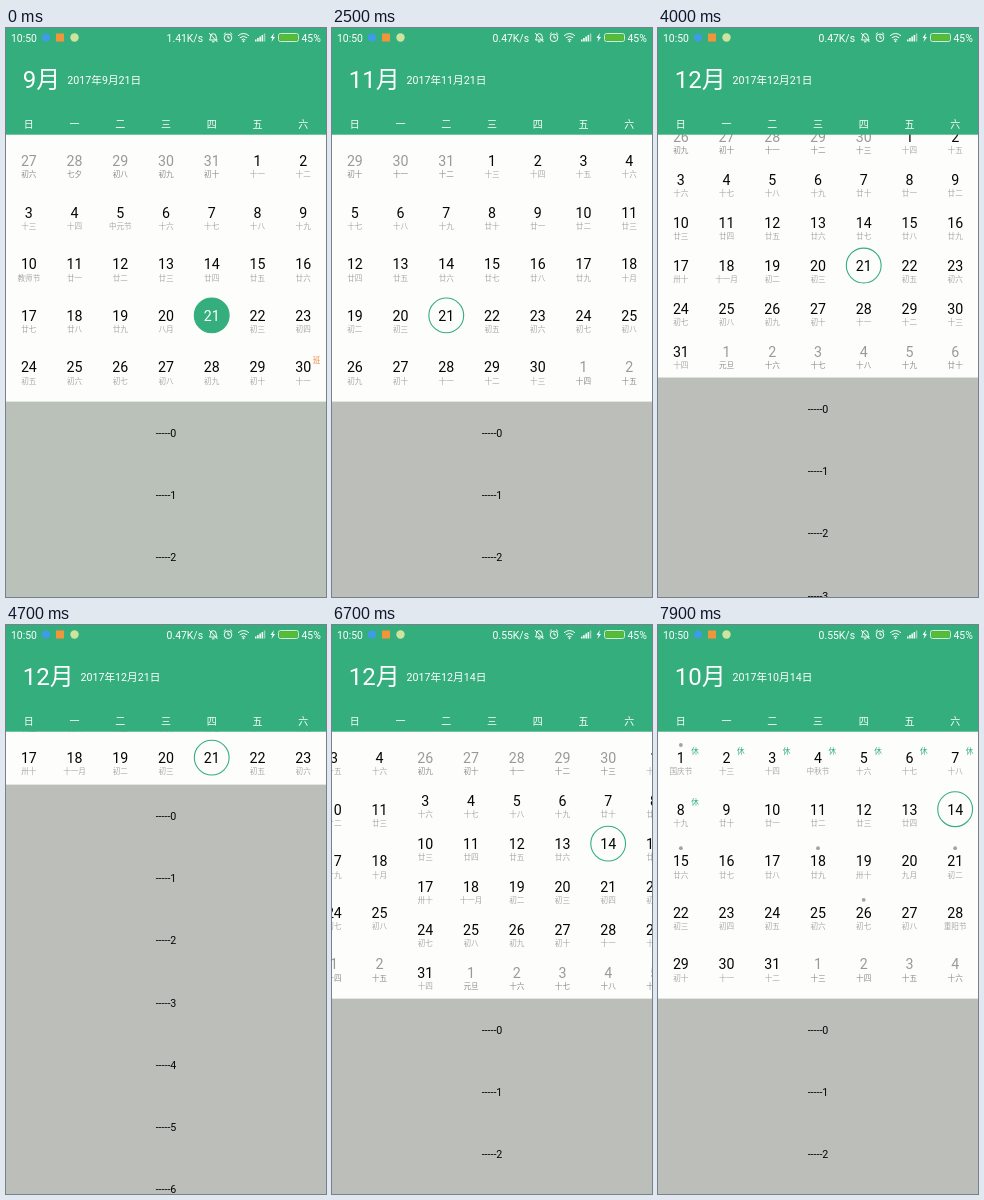
An HTML page that plays this animation: 320x569 px, repeating every 8000 ms.

```html
<!DOCTYPE html>
<html lang="zh-CN">
<head>
<meta charset="utf-8">
<title>Calendar</title>
<style>
html, body { margin: 0; width: 100%; height: 100%; overflow: hidden; background: #fdfefc; }
svg { display: block; width: 100vw; height: 100vh; font-family: Roboto, "Noto Sans CJK SC", "Noto Sans CJK", sans-serif; }
.mid { text-anchor: middle; }
.day { font-size: 14.2px; }
.lunar { font-size: 7.6px; }
</style>
</head>
<body>
<svg viewBox="0 0 320 569" preserveAspectRatio="none">
  <g id="pages"></g>
  <g id="list"></g>
  <rect width="320" height="106.7" fill="#35ae7d"/>
  <g id="bar" fill="#fff" font-size="10.4" transform="translate(0 0.5)"></g>
  <g fill="#fff">
    <text id="month" x="16.8" y="60.4" font-size="24"></text>
    <text id="date" y="56" font-size="10.67"></text>
    <g id="week" class="mid" font-size="10"></g>
  </g>
</svg>
<script>
const $ = id => document.getElementById(id);
const GREEN = '#35ae7d', INK = '#050505', LOOP = 8000, STEP = 100;
const TOP = 133, FULL = 373.6, FOLD = 214;
const colX = c => 320 / 7 * (c + 0.5);
const text = (x, y, s, attrs = '') => `<text x="${x}" y="${y}" ${attrs}>${s}</text>`;

// Calendar data
const dayNo = (m, d) => Date.UTC(2017, m - 1, d) / 864e5;
const moons = [['七月', 8, 22], ['八月', 9, 20], ['九月', 10, 20], ['十月', 11, 18], ['十一月', 12, 18]]
  .map(([name, m, d]) => ({ name, start: dayNo(m, d) }));
const feasts = { '8-28': '七夕', '9-5': '中元节', '9-10': '教师节', '10-1': '国庆节', '10-4': '中秋节', '10-28': '重阳节', '1-1': '元旦' };
const dots = ['10-1', '10-15', '10-18', '10-21', '10-26'];
const digits = '十一二三四五六七八九';

function lunar(n, key) {
  if (feasts[key]) return feasts[key];
  const moon = moons.filter(m => m.start <= n).pop();
  const d = n - moon.start + 1;
  if (d === 1) return moon.name;
  return (d <= 10 ? '初' : '十廿卅'[Math.floor(d / 10) - 1]) + digits[d % 10];
}

function cell(n, month, x, y, sel) {
  const date = new Date(n * 864e5), m = date.getUTCMonth() + 1, d = date.getUTCDate();
  const key = m + '-' + d, inside = m === month, today = key === '9-21';
  const number = fill => text(x, y + 5, d, `class="day" fill="${fill}"`);
  let out = number(!inside ? '#999' : today ? GREEN : INK)
    + text(x, y + 16.3, lunar(n, key), `class="lunar" fill="${inside ? '#a8a8a8' : '#8c8c8c'}"`);
  if (inside && dots.includes(key)) out += `<circle cx="${x}" cy="${y - 13}" r="1.9" fill="#a3a3a3"/>`;
  if (inside && d === sel) {
    out = `<g class="off">${out}</g><g class="on"><circle cx="${x}" cy="${y - 0.4}" r="17.4" `
      + `fill="${today ? GREEN : '#fdfefc'}" stroke="${GREEN}" stroke-width="1.1"/>`
      + number(today ? '#fff' : INK) + '</g>';
  }
  if (inside && m === 10 && d <= 8) out += text(x + 14.3, y - 4.3, '休', `class="lunar" fill="${GREEN}"`);
  if (inside && key === '9-30') out += text(x + 13.4, y - 4.3, '班', 'class="lunar" fill="#ee8b45"');
  return out;
}

function buildPage({ month, sel }) {
  const first = dayNo(month, 1), lead = new Date(first * 864e5).getUTCDay();
  const rows = Math.ceil((lead + dayNo(month + 1, 1) - first) / 7);
  const gap = rows === 6 ? 43 : 51.6;
  let out = '';
  for (let i = 0; i < rows * 7; i++) {
    out += cell(first - lead + i, month, colX(i % 7), TOP + Math.floor(i / 7) * gap, sel);
  }
  return { out, fold: Math.floor((lead + sel - 1) / 7) * gap };
}

// Views in order, each entered by a swipe
const views = [
  { month: 9, sel: 21 },
  { month: 10, sel: 21, at: 1300, n: 6, dir: 1 },
  { month: 11, sel: 21, at: 2200, n: 4, dir: 1 },
  { month: 12, sel: 21, at: 3100, n: 6, dir: 1 },
  { month: 12, sel: 14, at: 5000, n: 5, dir: -1 },
  { month: 11, sel: 14, at: 6700, n: 5, dir: -1 },
  { month: 10, sel: 14, at: 7500, n: 5, dir: -1 }
];
for (const v of views) {
  const { out, fold } = buildPage(v);
  $('pages').insertAdjacentHTML('beforeend', `<g class="mid">${out}</g>`);
  v.el = $('pages').lastChild;
  v.fold = fold;
  v.on = v.el.querySelector('.on');
  v.off = v.el.querySelector('.off');
}

// Fixed parts
$('week').innerHTML = [...'日一二三四五六'].map((s, i) => text(colX(i), 99.6, s)).join('');
let items = '<rect id="panel" width="320" height="480"/>';
for (let i = 0; i < 9; i++) items += text(160, 35.3 + i * 62.25, '-----' + i, `class="mid" font-size="10.67" fill="${INK}"`);
$('list').innerHTML = items;
$('bar').innerHTML = text(5, 13, '10:50') + text(197, 13, '', 'id="speed" text-anchor="end"')
  + text(295.5, 13, '45%')
  + `<circle cx="40" cy="9" r="4" fill="#3f9be8"/>
  <rect x="50" y="5" width="8" height="8" fill="#f2953a"/>
  <circle cx="68.5" cy="9" r="4.2" fill="#cfe3a0"/>
  <g fill="none" stroke="#fff">
    <path d="M203.5 11.5q1-1 1-3.5a2.8 2.8 0 0 1 5.6 0q0 2.5 1 3.500zM206 13.300h2.5M203 4.5l8.5 9"/>
    <circle cx="222" cy="9.300" r="3.8"/>
    <path d="M222 7v2.5h2M217.8 6l2-1.8M226.2 6l-2-1.8"/>
    <path d="M232 7.300q5.5-4.6 11 0M233.8 9.300q3.7-3 7.4 0M235.6 11.300q1.9-1.5 3.8 0"/>
  </g>
  <circle cx="237.5" cy="12.8" r="1"/>`
  + [2, 3.5, 5, 6.5, 8].map((h, i) => `<rect x="${249 + i * 2.2}" y="${13 - h}" width="1.5" height="${h}" opacity="${i < 4 ? 1 : 0.5}"/>`).join('')
  + `<path d="M268 4.5l-3.5 5h2l-1 4 3.5-5h-2z"/>
  <rect x="272.5" y="5" width="20" height="8" rx="2" fill="none" stroke="#d2efc8"/>
  <rect x="273.5" y="6" width="18" height="6" rx="1" fill="#58bd34"/>`;

// Motion
const ramp = (t, at, n) => Math.min(1, Math.max(0, (t - at + STEP) / (n * STEP)));
const swipe = u => 1 - (1 - u ** 1.88) ** 5;
const push = u => 1 - (1 - u ** 1.37) ** 2;
const settle = u => { const s = u ** 1.145; return s * s * (3 - 2 * s); };

// Folding moves month and list together until the selected row is on top;
// opening starts both from the folded pose
const monthLift = (v, lift, t) => t < 5700 ? Math.min(lift, v.fold) : Math.max(0, v.fold - (FOLD - lift));

function render(ms) {
  const t = Math.floor(ms / STEP) * STEP;
  const lift = FOLD * (push(ramp(t, 4000, 8)) - settle(ramp(t, 5700, 6)));

  let cur = 0;
  while (cur + 1 < views.length && t >= views[cur + 1].at) cur++;
  const { at, n, dir = 0 } = views[cur];
  const p = cur ? swipe(ramp(t, at, n)) : 1;
  const active = p > 0.45 ? cur : cur - 1;

  views.forEach((v, i) => {
    const shown = i === cur || (i === cur - 1 && p < 1);
    v.el.style.display = shown ? '' : 'none';
    if (!shown) return;
    const x = dir * 320 * (i === cur ? 1 - p : -p);
    v.el.setAttribute('transform', `translate(${x} ${-monthLift(v, lift, t)})`);
    v.on.style.display = i === active ? '' : 'none';
    v.off.style.display = i === active ? 'none' : '';
  });

  const { month, sel } = views[active];
  $('month').textContent = month + '月';
  $('date').setAttribute('x', month > 9 ? 74.5 : 61.3);
  $('date').textContent = `2017年${month}月${sel}日`;
  $('speed').textContent = (t < 1500 ? '1.41' : t < 5700 ? '0.47' : '0.55') + 'K/s';
  $('list').setAttribute('transform', `translate(0 ${FULL - lift})`);
  $('panel').setAttribute('fill', t < 1500 ? '#bac1b8' : '#bcbeba');
}

function frame(now) {
  render(now % LOOP);
  requestAnimationFrame(frame);
}
render(0);
requestAnimationFrame(frame);
</script>
</body>
</html>
```
